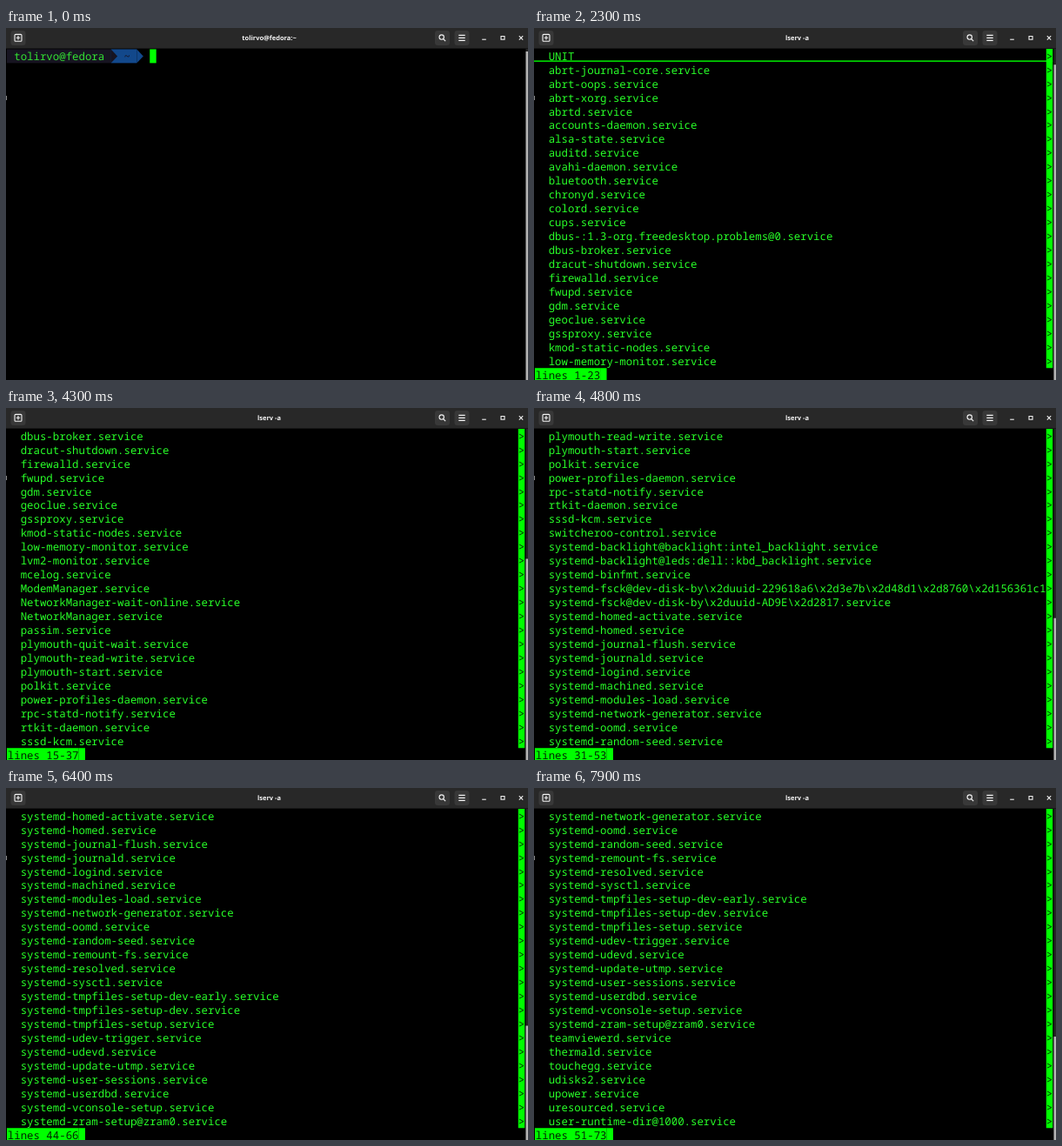
Animation of 600x405 px, one loop 8000 ms. Source, as an HTML page with a canvas:

```html
<!DOCTYPE html>
<html lang="en">
<head>
<meta charset="utf-8">
<title>Terminal</title>
<style>
html, body { margin: 0; width: 100%; height: 100%; overflow: hidden; background: #000; }
canvas { display: block; width: 600px; height: 405px; }
</style>
</head>
<body>
<canvas id="stage"></canvas>
<script>
const LOOP = 8000, W = 600, H = 405;
const GREEN = '#00ff00', TEXT = '#28ff28';
const CELL_W = 7.43, CELL_H = 15.95, LEFT = 1.8, TOP = 24.4;
const ROWS = 23, COLS = 79;
const USER = 'tolirvo@fedora';
const COMMAND = 'lserv -a';
const KEY_TIMES = [600, 800, 1000, 1400, 1500, 1700, 1900, 2000];
const PAGER_START = 2300;

const units = String.raw`abrt-journal-core abrt-oops abrt-xorg abrtd accounts-daemon
alsa-state auditd avahi-daemon bluetooth chronyd colord cups
dbus-:1.3-org.freedesktop.problems@0 dbus-broker dracut-shutdown firewalld fwupd gdm
geoclue gssproxy kmod-static-nodes low-memory-monitor lvm2-monitor mcelog ModemManager
NetworkManager-wait-online NetworkManager passim plymouth-quit-wait plymouth-read-write
plymouth-start polkit power-profiles-daemon rpc-statd-notify rtkit-daemon sssd-kcm
switcheroo-control systemd-backlight@backlight:intel_backlight
systemd-backlight@leds:dell::kbd_backlight systemd-binfmt
systemd-fsck@dev-disk-by\x2duuid-229618a6\x2d3e7b\x2d48d1\x2d8760\x2d156361c1
systemd-fsck@dev-disk-by\x2duuid-AD9E\x2d2817 systemd-homed-activate systemd-homed
systemd-journal-flush systemd-journald systemd-logind systemd-machined
systemd-modules-load systemd-network-generator systemd-oomd systemd-random-seed
systemd-remount-fs systemd-resolved systemd-sysctl systemd-tmpfiles-setup-dev-early
systemd-tmpfiles-setup-dev systemd-tmpfiles-setup systemd-udev-trigger systemd-udevd
systemd-update-utmp systemd-user-sessions systemd-userdbd systemd-vconsole-setup
systemd-zram-setup@zram0 teamviewerd thermald touchegg udisks2 upower uresourced
user-runtime-dir@1000`.split(/\s+/);
const lines = ['UNIT', ...units.map(unit => unit + '.service')];

const canvas = document.getElementById('stage');
const ctx = canvas.getContext('2d');
const scale = window.devicePixelRatio || 1;
canvas.width = W * scale;
canvas.height = H * scale;

const colX = col => LEFT + col * CELL_W;
const rowY = row => TOP + row * CELL_H;

function rect(x, y, w, h, color) {
  ctx.fillStyle = color;
  ctx.fillRect(x, y, w, h);
}

function polygon(points, color) {
  ctx.fillStyle = color;
  ctx.beginPath();
  points.forEach(([x, y]) => ctx.lineTo(x, y));
  ctx.fill();
}

function stroke(path, width = 1.1) {
  ctx.strokeStyle = '#f2f2f2';
  ctx.lineWidth = width;
  ctx.stroke(new Path2D(path));
}

function print(text, col, row, color = TEXT) {
  ctx.font = `500 ${CELL_W / 0.6}px "Noto Sans Mono", monospace`;
  ctx.textAlign = 'left';
  ctx.fillStyle = color;
  ctx.fillText(text, colX(col), rowY(row) + 12.3);
}

function drawCursor(col, row) {
  rect(colX(col), rowY(row), CELL_W, CELL_H, GREEN);
}

function drawHeader(title) {
  rect(0, 0, W, 23, '#282828');
  rect(0, 23, W, 1, '#161616');
  ctx.fillStyle = '#383838';
  for (const x of [5.5, 493, 515.5]) {
    ctx.beginPath();
    ctx.roundRect(x, 3, 17, 17, 3);
    ctx.fill();
  }
  stroke('M10 8.4Q10 7.4 11 7.4H17Q18 7.4 18 8.4V14.2Q18 15.2 17 15.2H11Q10 15.2 10 14.2Z');
  stroke('M11.8 11.3H16.2M14 9.1V13.5');
  stroke('M503.4 10.6A2.7 2.7 0 1 1 498 10.6A2.7 2.7 0 1 1 503.4 10.6M502.6 12.5L505.2 15.1');
  stroke('M520.3 8.4H527.7M520.3 11.4H527.7M520.3 14.4H527.7');
  stroke('M547.2 13.2H551.8');
  stroke('M569 9.5H573V13.3H569Z');
  stroke('M589.8 9.2L594.2 13.6M594.2 9.2L589.8 13.6');
  ctx.font = 'bold 7.5px "Open Sans", sans-serif';
  ctx.textAlign = 'center';
  ctx.fillStyle = '#f4f4f4';
  ctx.fillText(title, 302.5, 13.8);
}

function drawScrollbar(scrolledLines) {
  const top = 24, track = H - top;
  const hidden = scrolledLines / (scrolledLines + ROWS + 1);
  const y = top + 3 + track * hidden;
  rect(597.5, top, 2.5, track, '#242424');
  rect(597.5, y, 2.5, H - y, '#b4b4b4');
}

function drawShell(t) {
  const y = rowY(0), bottom = y + CELL_H, middle = y + CELL_H / 2;
  const blueStart = colX(16), blueEnd = colX(20);
  rect(1, y, blueStart - 1, CELL_H, '#171421');
  rect(blueStart, y, blueEnd - blueStart, CELL_H, '#12488b');
  polygon([[blueStart, y], [blueStart + CELL_W, middle], [blueStart, bottom]], '#171421');
  polygon([[blueEnd, y], [blueEnd + CELL_W, middle], [blueEnd, bottom]], '#12488b');
  print(USER, 1, 0, '#33e133');
  print('~', 18, 0, '#171421');

  const typed = KEY_TIMES.filter(time => time <= t).length;
  print(COMMAND.slice(0, typed), 22, 0);
  const blinkedOff = t >= 300 && t < 600;
  if (!blinkedOff) drawCursor(22 + typed, 0);
}

// One key press, a held key after the repeat delay, then single presses.
function topLine(t) {
  if (t < 3400) return 1;
  if (t < 3900) return 2;
  if (t < 5400) return Math.min(39, Math.floor(2.3 + (t - 3900) * 0.032));
  return Math.min(51, 39 + Math.floor((t - 5400) / 200));
}

function drawPager(t) {
  const top = topLine(t);
  rect(colX(COLS), 24, CELL_W, rowY(ROWS) - 24, GREEN);
  for (let row = 0; row < ROWS; row++) {
    print(lines[top - 1 + row].slice(0, COLS - 2), 2, row);
    print('>', COLS, row, '#003000');
  }
  if (top === 1) rect(0, 37.4, colX(COLS + 1), 1.4, GREEN);

  const status = `lines ${top}-${top + ROWS - 1}`;
  rect(1, rowY(ROWS), colX(status.length) - 1, CELL_H, GREEN);
  print(status, 0, ROWS, '#002400');
  const blinkedOff = t >= 2900 && t < 3400;
  if (!blinkedOff) drawCursor(status.length, ROWS);
  return top;
}

function draw(now) {
  const t = Math.floor(now % LOOP / 100) * 100;
  const paging = t >= PAGER_START;
  ctx.setTransform(scale, 0, 0, scale, 0, 0);
  ctx.textRendering = 'geometricPrecision';
  rect(0, 0, W, H, '#000');
  rect(0, 78, 1, 5, '#8a8a8a');
  const scrolled = paging ? drawPager(t) : 0;
  if (!paging) drawShell(t);
  drawScrollbar(scrolled);
  drawHeader(paging ? COMMAND : USER + ':~');
}

const start = performance.now();
function tick() {
  draw(performance.now() - start);
  requestAnimationFrame(tick);
}
tick();
</script>
</body>
</html>
```
